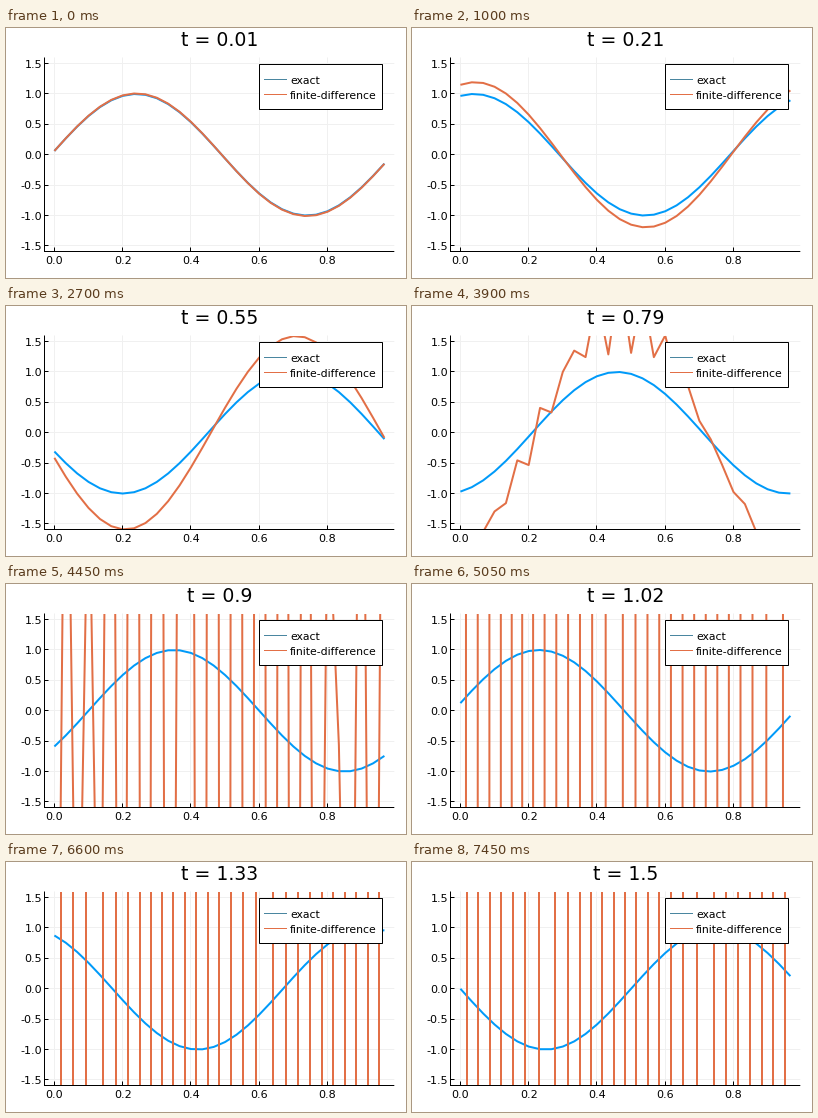
Recreate the animation shown at these times as a matplotlib script. Size 400 px wide and 250 px high, loop 7.5 s.

```python
import numpy as np
import matplotlib.pyplot as plt
from matplotlib.animation import FuncAnimation
from matplotlib.patches import Rectangle

plt.rcParams["font.family"] = "DejaVu Sans"
plt.rcParams["lines.solid_capstyle"] = "butt"

W, H, DPI = 400, 250, 100
LEFT, RIGHT, TOP, BOTTOM = 38.5, 388.3, 29.5, 224.0
BLUE, ORANGE = "#009af9", "#e26f46"
FRAMES, DT, N = 150, 0.01, 30
C = DT * N
x = np.arange(N) / N

# Rounding-error sawtooth of the unstable scheme: its envelope at step BURST.
BURST = 79
envelope = np.array([
    -.03, -.01, -.01, -.06, -.13, -.21, -.26, -.27, -.21, -.08,
    .09, .30, .48, .60, .64, .62, .50, .36, .25, .17,
    .11, .06, .03, 0, -.06, -.09, -.09, -.08, -.07, -.05])
waves = np.fft.fftfreq(N, 1 / N)
spectrum = np.fft.fft(envelope) * (np.abs(waves) <= 6)
sign = (-1.0) ** np.arange(N)


def gain(theta):
    """Growth per step of a mode under the downwind difference."""
    return 1 + C * (1 - np.exp(-1j * theta))


def exact(t):
    return np.sin(2 * np.pi * (x + t))


def finite_difference(step):
    wave = gain(2 * np.pi / N) ** step * np.exp(2j * np.pi * x)
    growth = gain(np.pi + 2 * np.pi * waves / N) ** (step - BURST)
    return wave.imag + sign * np.fft.ifft(spectrum * growth).real


fig = plt.figure(figsize=(W / DPI, H / DPI), dpi=DPI, facecolor="white")

# Pixel coordinates, y downwards: one layer below the curves, one above
extent = dict(xlim=(0, W), ylim=(H, 0))
back = fig.add_axes([0, 0, 1, 1], zorder=0, **extent)
ax = fig.add_axes([LEFT / W, 1 - BOTTOM / H, (RIGHT - LEFT) / W, (BOTTOM - TOP) / H],
                  zorder=1)
page = fig.add_axes([0, 0, 1, 1], zorder=2, **extent)
pad = 0.03 * x[-1]
ax.set(xlim=(-pad, x[-1] + pad), ylim=(-1.6, 1.6))
for layer in (back, ax, page):
    layer.axis("off")


def pt(px):
    return px * 72 / DPI


def rule(xs, ys, color="black", layer=page, **kw):
    layer.plot(xs, ys, color=color, lw=pt(1), snap=False, **kw)


def label(px, py, text, size=8, **kw):
    return page.text(px, py, text, fontsize=size, va="baseline", **kw)


def to_px(v, lo, hi, a, b):
    return a + (v - lo) / (hi - lo) * (b - a)


def crisp(px):
    return np.floor(px) + 0.5


AXIS_X, AXIS_Y = crisp(LEFT), BOTTOM - 0.5
GRID = "#f0f0f0"
for v in (0, 0.2, 0.4, 0.6, 0.8):
    px = to_px(v, *ax.get_xlim(), LEFT, RIGHT)
    line = [crisp(px)] * 2
    rule(line, [TOP, BOTTOM], GRID, back)
    rule(line, [AXIS_Y, AXIS_Y - 4])
    label(px, 236, f"{v:.1f}", ha="center")
for v in np.arange(-1.5, 1.6, 0.5):
    py = to_px(v, -1.6, 1.6, BOTTOM, TOP)
    line = [crisp(py)] * 2
    rule([LEFT, RIGHT], line, GRID, back)
    rule([AXIS_X, AXIS_X + 4], line)
    label(36, py + 4, f"{v:.1f}", ha="right")
rule([AXIS_X] * 2, [TOP, BOTTOM])
rule([AXIS_X - 0.5, RIGHT], [AXIS_Y] * 2)

page.add_patch(Rectangle((253.5, 36.5), 123, 45, fc="white", ec="black",
                         lw=pt(1), snap=False, zorder=5))
for py, name, color in ((51.5, "exact", "#4a86a0"),
                        (66.5, "finite-difference", ORANGE)):
    rule([258, 281], [py, py], color, zorder=6)
    label(284, py + 4.3, name, 7.8, zorder=6)

title = label((LEFT + RIGHT) / 2, 18, "", 13.6, ha="center")
exact_line, = ax.plot([], [], color=BLUE, lw=pt(2), zorder=2)
fd_line, = ax.plot([], [], color=ORANGE, lw=pt(2), zorder=3)


def draw(frame):
    step = frame + 1
    t = round(step * DT, 2)
    exact_line.set_data(x, exact(t))
    fd_line.set_data(x, finite_difference(step))
    title.set_text(f"t = {t}")
    return exact_line, fd_line, title


anim = FuncAnimation(fig, draw, frames=FRAMES, interval=50, repeat=True,
                     repeat_delay=0, init_func=lambda: draw(0))
plt.show()
```
